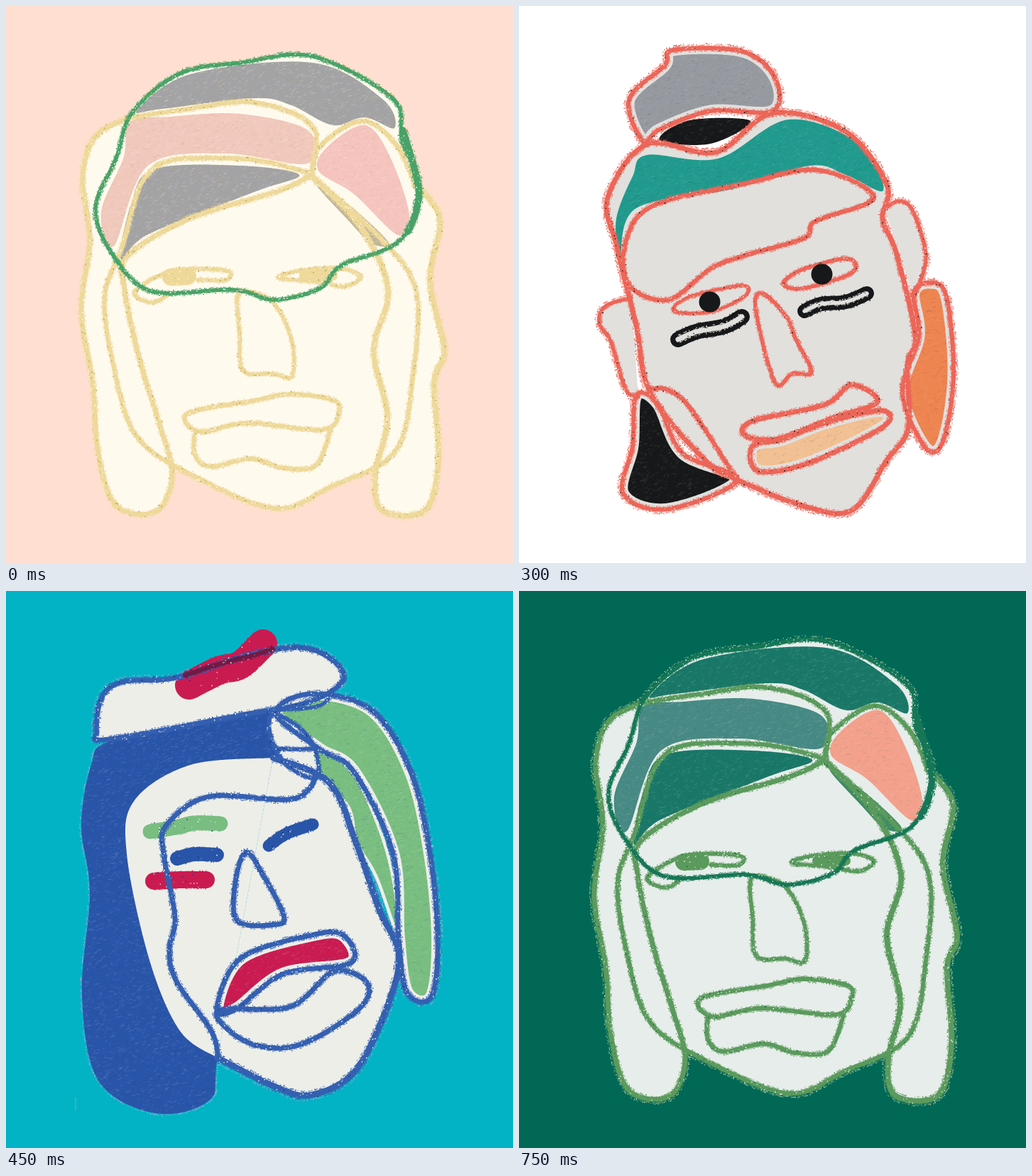
Recreate the animation shown at these times as an HTML page with a canvas. Size 714 by 785 pixels, loop 0.9 s.

```html
<!DOCTYPE html>
<html lang="en">
<head>
<meta charset="utf-8">
<title>Crayon faces</title>
<style>
html, body { margin: 0; width: 100%; height: 100%; overflow: hidden; }
canvas { display: block; }
</style>
</head>
<body>
<canvas id="stage" width="714" height="785"></canvas>
<script>
const W = 714, H = 785, HOLD = 150;

// Key points are joined by smooth curves; colours are roles looked up in a palette.
const sheet = (knots, width, options) =>
  ({ knots, width, closed: true, sheet: true, fill: 'paper', pen: 'line', ...options });
const flap = (knots, width, options) => sheet(knots, width, { closed: false, ...options });
const patch = (fill, knots) => ({ knots, fill, closed: true });
const loop = (knots, width) => ({ knots, width, closed: true, pen: 'line' });
const line = (knots, width, pen = 'line') => ({ knots, width, pen });
const tube = (knots, width, pen) => [line(knots, width, pen), line(knots, width - 15, 'paper')];

const curls = [
  flap('172 158 126 184 108 242 118 330 106 430 122 530 130 630 155 704 212 712 234 660 217 592 190 505 167 400 172 352 260 299 380 262 430 239', 9),
  flap('215 222 188 255 164 338 139 410 152 510 185 608 270 665 380 708 458 677 548 628 573 520 577 400 525 325 430 239', 8),
  flap('430 239 500 312 538 400 518 485 537 580 520 660 530 711 590 711 609 640 603 530 617 485 597 386 611 300 575 250', 10),
  patch('a', '185 147 260 96 432 80 530 131 547 172 505 157 460 168 402 140 350 130 220 145'),
  patch('b', '175 163 230 156 330 152 425 175 424 222 310 208 200 225 152 338 134 290 165 215'),
  patch('a', '208 230 330 225 413 238 350 262 200 322 162 357 176 280'),
  patch('c', '453 198 506 168 542 215 568 295 552 323 490 265 440 232'),
  patch('d', '438 253 480 278 538 332 515 335 480 300'),
  line('172 158 250 146 350 136 432 170 430 239', 8),
  line('430 236 350 217 250 215 215 224', 8),
  line('432 237 440 200 500 162 549 195 578 256', 8),
  line('232 382 256 381', 26),
  line('232 404 206 418 181 403 235 373 310 373 310 386 270 386', 7),
  loop('384 383 415 373 470 370 500 381 478 395 440 389', 7),
  line('420 380 460 380', 16),
  loop('326 408 329 460 334 514 375 518 403 521 402 470 378 420 345 403', 7),
  loop('256 574 350 556 400 547 460 555 469 572 446 597 340 588 273 600', 8),
  line('266 600 266 632 288 649 345 638 390 651 436 648 457 598', 8),
  sheet('178 150 245 95 330 80 432 71 545 131 558 190 582 255 555 330 472 366 442 398 378 414 320 400 205 402 150 350 126 285 155 215', 7, { pen: 'rim' }),
  line('559 175 580 250 578 288 566 318', 12, 'rim')
];

const beret = [
  sheet('145 212 280 179 375 173 384 225 330 400 298 655 286 718 210 736 130 690 107 570 118 425 106 330 120 245', 0, { fill: 'hair' }),
  line('258 133 300 112 330 104 362 74', 42, 'red'),
  sheet('128 197 135 150 165 128 240 122 350 88 430 82 476 120 430 155 330 175 145 209', 9),
  line('252 119 300 103 350 90 376 82', 8, 'shade'),
  flap('376 235 260 245 181 295 170 370 202 520 245 620 298 658', 0),
  flap('376 235 455 270 493 355 526 450 553 510 539 580 492 676 430 710 380 699 298 658', 11),
  sheet('376 174 373 205 395 245 437 264 436 225 415 194', 7),
  sheet('440 222 490 255 530 340 550 420 552 490 520 405 492 355 480 305 440 262', 0, { inset: 'a' }),
  sheet('380 172 430 145 515 168 570 255 597 370 608 490 599 572 565 566 553 490 545 370 490 255 440 222', 9, { inset: 'a' }),
  line('203 339 240 333 265 327 302 328', 23, 'a'),
  line('208 409 245 407 282 407', 26, 'red'),
  line('241 377 265 371 297 372', 22, 'hair'),
  line('370 359 395 342 432 329', 19, 'hair'),
  line('437 258 426 280 395 294 285 290 226 330 222 370 238 460 230 505 240 550 289 620 299 660', 9),
  line('378 222 410 223 440 222', 7),
  line('382 168 440 162 460 144', 6),
  loop('338 368 323 410 326 465 380 470 391 457 362 400', 9),
  sheet('297 588 330 518 430 485 475 485 486 524 390 540 323 590', 9, { inset: 'red' }),
  loop('298 592 400 586 462 536 509 553 496 590 412 640 340 636', 9),
  line('98 714 98 732', 1, 'edge')
];

const topknot = [
  sheet('165 549 160 620 147 688 210 709 307 668 230 630 195 560', 8, { inset: 'dark' }),
  flap('182 540 210 541 242 568 307 668', 8),
  sheet('180 195 125 270 138 340 165 450 185 545 260 638 306 667 405 706 470 710 518 640 548 595 547 505 558 465 532 350 512 300 518 252 460 177 358 151 277 206', 9),
  sheet('175 191 155 132 205 84 217 62 315 64 361 102 357 148 270 148 198 174', 8, { inset: 'a' }),
  flap('158 411 122 423 113 446 130 475 150 540 168 551', 7),
  flap('515 286 535 275 555 290 573 355 556 410', 7),
  sheet('556 404 580 390 602 410 612 520 597 614 572 622 540 545 563 465', 8, { inset: 'c' }),
  patch('b', '180 210 280 215 380 160 480 195 513 260 460 238 410 225 300 258 165 285 142 354 137 300 160 240'),
  patch('dark', '198 189 240 161 326 162 270 194'),
  loop('151 330 190 281 320 250 420 231 500 270 418 303 402 327 320 351 270 370 210 414 154 392', 8),
  loop('218 430 240 410 315 394 318 409 270 431', 6),
  loop('372 391 400 371 463 356 469 376 400 398', 7),
  line('268 417 269 417', 31, 'dark'),
  line('426 378 427 378', 31, 'dark'),
  tube('224 470 250 459 290 451 314 438', 24, 'dark'),
  tube('402 430 425 420 460 417 490 405', 22, 'dark'),
  loop('345 406 333 425 360 530 385 518 412 516 390 470 378 440', 7),
  loop('318 605 329 585 430 562 468 534 505 558 440 581 365 610', 9),
  sheet('329 620 370 611 430 588 510 570 513 593 405 645 336 655', 9, { inset: 'd' })
].flat();

const scenes = [
  { shapes: curls, bg: '#ffdfd2', paper: '#fffaee', line: '#eed99a', rim: '#48a267', edge: '#fae3b9',
    dark: '#b3a04a', a: '#a3a3a5', b: '#f1c8bc', c: '#f5c4be', d: '#c2b69a', grain: .2 },
  { shapes: beret, bg: '#21359a', paper: '#d8deee', line: '#21399b', hair: '#21359a', edge: '#62aeca',
    dark: '#182878', shade: '#2b2370', a: '#129fb4', red: '#9c1b58', grain: .06 },
  { shapes: topknot, bg: '#ffffff', paper: '#e1e0dd', line: '#ec6658', edge: '#ec6658',
    dark: '#171819', a: '#969aa0', b: '#219a8e', c: '#ee8551', d: '#f2c092', grain: .1 },
  { shapes: beret, bg: '#02b3c5', paper: '#edeee8', line: '#3560b1', hair: '#2955a9', edge: '#8eb0d5',
    dark: '#183476', shade: '#701a45', a: '#79be80', red: '#ca1b51', grain: .12 },
  { shapes: topknot, bg: '#ec235f', paper: '#fee8db', line: '#ec235f', edge: '#e6935e',
    dark: '#560a28', a: '#ed7d68', b: '#75868c', c: '#e82b60', d: '#f09582', grain: .1 },
  { shapes: curls, bg: '#016856', paper: '#e7edea', line: '#5b9a5d', rim: '#167756', edge: '#a0c598',
    dark: '#176f45', a: '#197768', b: '#478984', c: '#f3a08c', d: '#3e8a64', grain: .13 }
];

function randomFrom(seed) {
  return () => {
    seed = (seed * 1664525 + 1013904223) >>> 0;
    return seed / 4294967296;
  };
}

// Catmull-Rom curve sampled about every two pixels
function smooth({ knots: text, closed }) {
  const knots = text.match(/\d+ \d+/g).map(pair => pair.split(' ').map(Number));
  const count = knots.length, out = [];
  const at = i => knots[closed ? (i + count) % count : Math.max(0, Math.min(count - 1, i))];
  for (let i = 0; i < (closed ? count : count - 1); i++) {
    const [p, q, r, s] = [at(i - 1), at(i), at(i + 1), at(i + 2)];
    const steps = Math.ceil(Math.hypot(r[0] - q[0], r[1] - q[1]) / 2);
    for (let k = 0; k < steps; k++) {
      const t = k / steps;
      out.push([0, 1].map(d => q[d] + t / 2 * (r[d] - p[d] +
        t * (2 * p[d] - 5 * q[d] + 4 * r[d] - s[d] + t * (3 * (q[d] - r[d]) + s[d] - p[d])))));
    }
  }
  out.push(at(closed ? 0 : count - 1));
  return out;
}

function paint(scene) {
  const picture = document.createElement('canvas');
  picture.width = W;
  picture.height = H;
  const ctx = picture.getContext('2d');
  const random = randomFrom(7);

  function trace(points) {
    ctx.beginPath();
    points.forEach(p => ctx.lineTo(...p));
  }

  function stroke(points, colour, width) {
    trace(points);
    ctx.strokeStyle = colour;
    ctx.lineWidth = width;
    ctx.stroke();
  }

  // Loose specks on both sides of a curve, between two distances from its centre
  function specks(points, near, far, colour, amount) {
    ctx.fillStyle = colour;
    for (let i = 1; i < points.length; i++) {
      const [x, y] = points[i], [px, py] = points[i - 1];
      const dx = x - px, dy = y - py, length = Math.hypot(dx, dy) || 1;
      for (let k = 0; k < amount; k++) {
        if (random() > amount - k) continue;
        const off = (near + (far - near) * random()) * (random() < .5 ? -1 : 1) / length;
        const size = .7 + random();
        ctx.fillRect(x - dy * off - size / 2, y + dx * off - size / 2, size, size);
      }
    }
  }

  function crayonLine({ points, pen, width }) {
    const colour = scene[pen], bold = width > 15;
    stroke(points, colour, bold ? width - 2 : width * .78);
    if (width < 3) return;
    specks(points, width * .36, width * (bold ? .5 : .6), colour, 2);
    specks(points, 0, width * .5, scene.paper, scene.grain * 2);
    specks(points, 0, width * .5, scene.dark, scene.grain);
  }

  // Short slanted strokes inside the current clip
  function hatch(points) {
    const xs = points.map(p => p[0]), ys = points.map(p => p[1]);
    const x0 = Math.min(...xs), y0 = Math.min(...ys);
    const w = Math.max(...xs) - x0, h = Math.max(...ys) - y0;
    ctx.lineWidth = 1;
    for (let i = 0; i < w * h / 22; i++) {
      const x = x0 + w * random(), y = y0 + h * random();
      ctx.globalAlpha = scene.grain * (.3 + random());
      ctx.strokeStyle = random() < .6 ? scene.paper : scene.dark;
      ctx.beginPath();
      ctx.moveTo(x, y);
      ctx.lineTo(x + 1 + 4 * random(), y - 3 * random());
      ctx.stroke();
    }
    ctx.globalAlpha = 1;
  }

  // An inset colour leaves a bare paper margin along the outline
  function crayonFill({ points, fill, inset, width }) {
    const colour = inset || fill;
    ctx.save();
    trace(points);
    ctx.fillStyle = scene[colour];
    ctx.fill();
    ctx.clip();
    if (colour !== 'paper') hatch(points);
    if (inset) stroke(points, scene.paper, width + 9);
    ctx.restore();
  }

  ctx.lineJoin = ctx.lineCap = 'round';
  ctx.fillStyle = scene.bg;
  ctx.fillRect(0, 0, W, H);

  const shapes = scene.shapes.map(shape => ({ ...shape, points: smooth(shape) }));
  const sheets = shapes.filter(s => s.sheet);
  sheets.forEach(s => specks(s.points, s.width * .5, s.width * .5 + 2.5, scene.edge, 2));
  sheets.forEach(crayonFill);
  shapes.filter(s => s.fill && !s.sheet).forEach(crayonFill);
  shapes.filter(s => s.width).forEach(crayonLine);
  return picture;
}

const pictures = scenes.map(paint);
const stage = document.getElementById('stage').getContext('2d');

function draw() {
  const index = Math.floor(performance.now() / HOLD) % pictures.length;
  stage.drawImage(pictures[index], 0, 0);
  requestAnimationFrame(draw);
}
draw();
</script>
</body>
</html>
```
